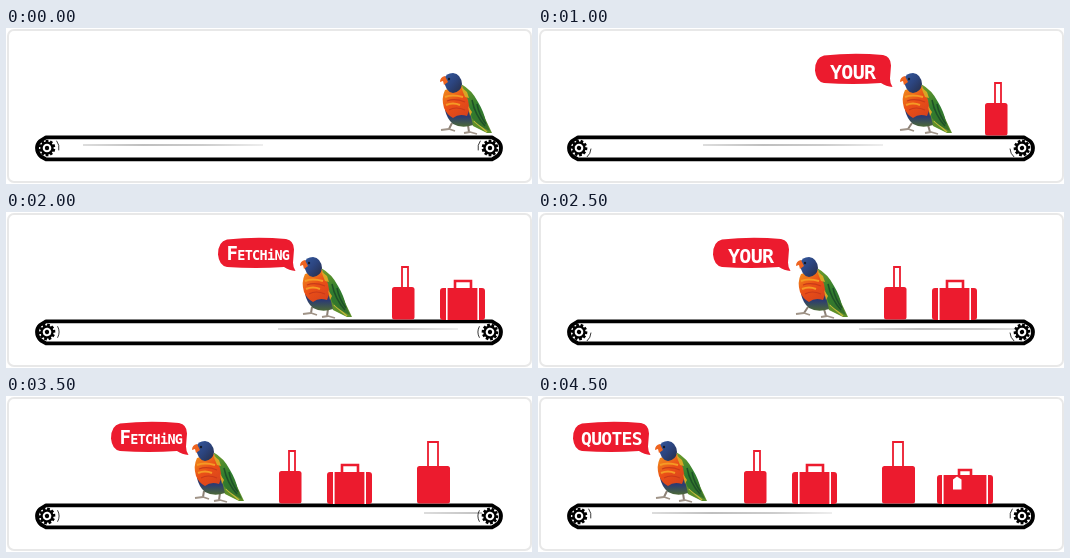
Animation, 526 px wide and 156 px high, one loop 5 s. Source, as an HTML page with a canvas:

```html
<!DOCTYPE html>
<html lang="en">
<head>
<meta charset="utf-8">
<title>Fetching your quotes</title>
<style>
html, body { margin: 0; width: 100%; height: 100%; overflow: hidden; background: #fff; }
canvas { display: block; }
</style>
</head>
<body>
<canvas id="stage" width="526" height="156"></canvas>
<script>
const ctx = document.getElementById('stage').getContext('2d');
const RED = '#ec1b2e';
const STEP = 500, STEPS = 10;

// Left edges, one per step
const birdX = [434, 398, 362, 328, 294, 258, 223, 186, 155, 117];
const bubbleX = [0, 314, 277, 245, 212, 175, 138, 105, 71, 35];
const caseX = [516, 482, 447, 417, 386, 346, 307, 273, 237, 206];
const streakX = [77, 121, 165, 218, 272, 321, 370, 418, 77, 114];

function fill(color, d) {
  ctx.fillStyle = color;
  ctx.fill(new Path2D(d));
}

function line(color, width, d) {
  ctx.strokeStyle = color;
  ctx.lineWidth = width;
  ctx.stroke(new Path2D(d));
}

function box(color, x, y, w, h, r = 0) {
  ctx.fillStyle = color;
  ctx.beginPath();
  ctx.roundRect(x, y, w, h, r);
  ctx.fill();
}

function disc(color, x, y, r) {
  ctx.fillStyle = color;
  ctx.beginPath();
  ctx.arc(x, y, r, 0, Math.PI * 2);
  ctx.fill();
}

function gradient(x0, y0, x1, y1, ...colors) {
  const g = ctx.createLinearGradient(x0, y0, x1, y1);
  colors.forEach((c, i) => g.addColorStop(i / (colors.length - 1), c));
  return g;
}

function at(x, y, draw) {
  ctx.save();
  ctx.translate(x, y);
  draw();
  ctx.restore();
}

function panel() {
  box('#fff', 0, 0, 526, 156);
  ctx.strokeStyle = '#e8e8e8';
  ctx.lineWidth = 2;
  ctx.beginPath();
  ctx.roundRect(2, 2, 523, 152, 6);
  ctx.stroke();
}

function gear(x, side, phase) {
  at(x, 120, () => {
    ctx.scale(side, 1);
    ctx.save();
    ctx.rotate(phase * Math.PI / 15);
    for (let i = 0; i < 10; i++) {
      ctx.rotate(Math.PI / 5);
      box('#000', -1.4, -8.3, 2.8, 4);
    }
    disc('#000', 0, 0, 6.6);
    disc('#fff', 0, 0, 4.3);
    disc('#000', 0, 0, 2.2);
    ctx.restore();
    const [from, to] = [[-0.65, 0.2], [-0.5, 0.5], [0.05, 0.85]][phase];
    ctx.strokeStyle = '#222';
    ctx.lineWidth = 0.9;
    ctx.beginPath();
    ctx.arc(0, 0, 12, from, to);
    ctx.stroke();
  });
}

function belt(step) {
  ctx.lineJoin = 'round';
  line('#000', 3.8, 'M40 109.3 H486 L492 113 Q495 116 495 120 Q495 126 490 129 L486 131.4 H40 L35 128.5 Q31 125 31 120 Q31 116 34 113 Z');
  const x = streakX[step], end = Math.min(x + 180, 476);
  const shade = gradient(x, 0, x + 180, 0, '#bbb', '#808080', '#999', '#ddd');
  fill(shade, `M${x} 116.4 L${end} 116.6 V117.6 L${x} 117.6 Z`);
  gear(41, 1, step % 3);
  gear(484, -1, step % 3);
}

function handle(x, y, w, bottom, weight) {
  ctx.lineJoin = 'miter';
  line(RED, weight, `M${x + 1} ${bottom} V${y + 1} h${w - 2} V${bottom}`);
}

function trolley(w, top, handleTop, handleX, handleW) {
  handle(handleX, handleTop, handleW, top + 1, 1.8);
  box(RED, 0, top, w, 107.5 - top, 2.5);
}

function suitcase(w, top, handleTop, handleX, handleW, seam) {
  handle(handleX, handleTop, handleW, top + 1, 2.6);
  box(RED, 0, top, w, 108 - top, 3);
  box('#fff', seam, top, 1.6, 108 - top);
  box('#fff', w - seam - 1.6, top, 1.6, 108 - top);
}

const luggage = [
  { dx: 0, w: 23, draw: () => trolley(22.5, 75, 54, 9, 8) },
  { dx: 48, w: 45, draw: () => suitcase(45, 76, 68, 14, 18, 6) },
  { dx: 138, w: 33, draw: () => trolley(33, 70, 45, 10, 12) },
  { dx: 193, w: 56, draw: () => {
    suitcase(56, 79, 73, 21, 14, 5);
    fill('#fff', 'M16 83.5 L20 80.5 L24.5 83.5 V93.5 H16 Z');
  } }
];

function cases(step) {
  for (const { dx, w, draw } of luggage) {
    const x = caseX[step] + dx;
    if (x + w < 494) at(x, 0, draw);
  }
}

function feet(phase) {
  const a = [0, 2, -1][phase];
  line('#8c8176', 2, `M12 95 L${9 + a} 101 M28 97 L${29 - a} 104`);
  line('#a09488', 1.8, `M${1 + a} 102 L${9 + a} 101 L${15 + a} 103 M${24 - a} 105 L${30 - a} 104 L${37 - a} 106`);
}

function bird(step) {
  at(birdX[step], 0, () => {
    feet(step % 3);
    // Tail and belly
    fill('#5d8f2a', 'M27 84 L43 86 L52 105 L47 105 L33 98 Z');
    line('#c0b83a', 1.5, 'M34 93 L47 104');
    fill(gradient(0, 78, 0, 99, '#34325c', '#2c3c72', '#4d6a35'), 'M5 82 L28 78 L33 97 Q22 101 13 96 Q7 91 5 82 Z');
    // Breast
    fill(gradient(4, 62, 24, 88, '#f08a1c', '#ea4f17', '#d9441c'), 'M5 62 L21 57 Q29 66 30 80 L27 88 Q19 85 13 90 Q7 87 4 80 Q1 70 5 62 Z');
    line('#f59a25', 2, 'M5 69 Q12 66 23 69 M6 77 Q13 74 20 77');
    line('#c93a1a', 1.2, 'M7 73 Q15 70 25 74 M9 82 Q16 78 25 82');
    // Wing
    fill(gradient(24, 58, 44, 100, '#6b9a2b', '#2f7d2f', '#37722b'), 'M21 56 Q32 62 38 74 Q44 84 46 94 L50 103 Q38 98 32 90 Q29 80 28 72 Q25 64 21 56 Z');
    fill('#d8a625', 'M21 59 L27 64 L29 70 L25 69 Z M28 78 L32 84 L30 88 Z');
    line('#1e5128', 1.5, 'M32 72 Q35 87 45 98 M37 76 Q39 87 46 96');
    // Head
    fill(gradient(4, 46, 22, 62, '#34589c', '#2c4580', '#27304d'), 'M4 51 Q6 45 13 45 Q21 46 22 56 Q21 64 13 65 Q5 64 4 51 Z');
    fill('#ee6420', 'M5 48 Q0 49 0 54 L3 53 L4 57 L8 54 Z');
    disc('#151a28', 9, 51, 1.2);
  });
}

function word(text, x, y, size) {
  ctx.font = `bold ${size}px "DejaVu Sans Mono", monospace`;
  ctx.letterSpacing = '-0.7px';
  ctx.fillText(text, x, y);
  return ctx.measureText(text).width;
}

const words = [
  () => word('QUOTES', 8, 23, 18),
  () => word('ETCHiNG', 8.5 + word('F', 8.5, 22.5, 19), 22, 13.5),
  () => word('YOUR', 15, 25, 20)
];

function bubble(step) {
  if (!step) return;
  at(bubbleX[step], 25.5, () => {
    fill(RED, 'M9 2 Q38 -1 68 1.5 Q76 3 76 12 L75 25 Q75 30 77.5 33.5 Q71 33 66 29.5 Q38 31.5 9 29.5 Q1 28 0 17 Q0 4 9 2 Z');
    ctx.fillStyle = '#fff';
    words[step % 3]();
  });
}

function frame(now) {
  const step = Math.floor(now / STEP) % STEPS;
  panel();
  belt(step);
  cases(step);
  bird(step);
  bubble(step);
}

const start = performance.now();
function tick() {
  frame(performance.now() - start);
  requestAnimationFrame(tick);
}
tick();
</script>
</body>
</html>
```
